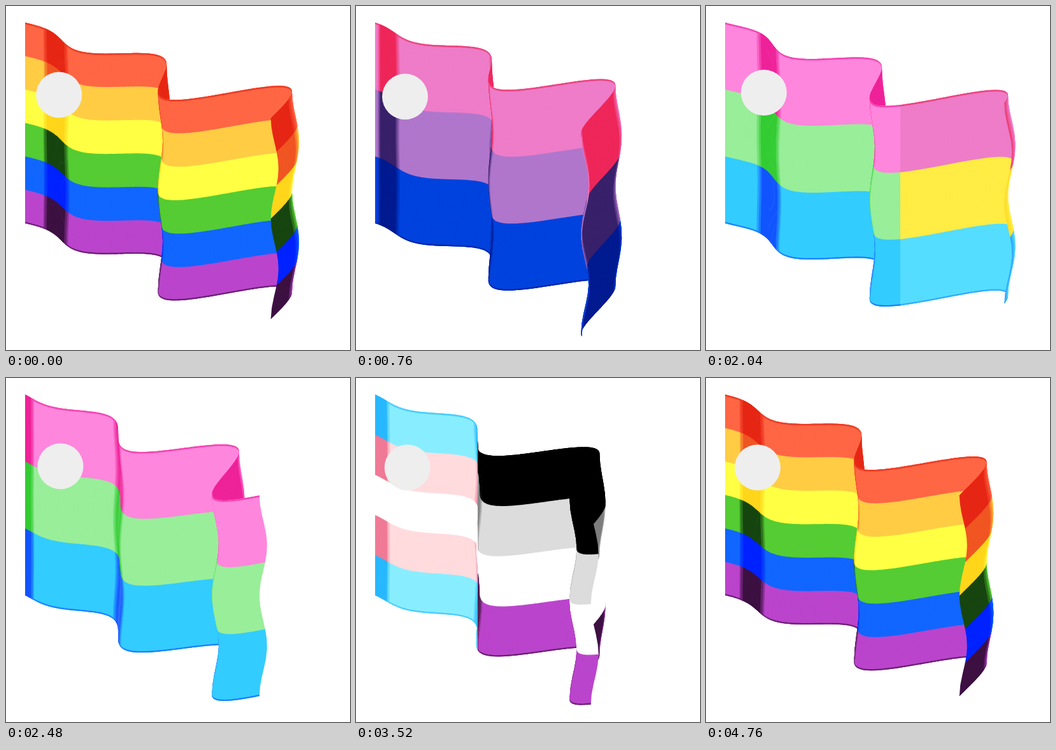
Write an HTML page with a canvas that moves like this. It is 540 by 540 pixels and loops after 4800 ms.

```html
<!DOCTYPE html>
<html lang="en">
<head>
<meta charset="utf-8">
<title>Waving pride flags</title>
<style>
  html, body { margin: 0; height: 100%; overflow: hidden; background: #fff; }
  canvas { display: block; width: 540px; height: 540px; }
</style>
</head>
<body>
<canvas id="stage" width="540" height="540"></canvas>
<script>
const ctx = document.getElementById('stage').getContext('2d');
const LOOP = 4800, STEP = 40, WAVE = 960, TURN = 800;
const COLUMNS = 220, WAVES = 2.28, HEIGHT = 315, SHADES = 4;
const TAU = Math.PI * 2;

// Each stripe is "lit shaded".
const purple = 'bb44cc 3d1042', pink = 'ee7cc8 ee2659', white = 'ffffff ffffff';
const sky = '88eeff 28b8ff', blush = 'ffdbde f07a96';
const flags = [
  ['ff6644 e62614', 'ffcc44 f05522', 'ffff44 ffd61a', '55cc33 16450f', '1166ff 0022ff', purple],
  [pink, 'b076cc 38206a', '0042dd 001a90'],
  [pink, 'ffec44 ffd61a', '55ddff 2090ff'],
  ['ff86dd ee2299', '99ee99 33cc33', '33ccff 1155ff'],
  ['000000 000000', 'dcdcdc 7d7d7d', white, purple],
  [sky, blush, white, blush, sky]
].map(stripes => stripes.map(ramp));

function ramp(pair) {
  const [lit, dark] = pair.split(' ').map(hex =>
    [0, 2, 4].map(i => parseInt(hex.slice(i, i + 2), 16)));
  return Array.from({ length: SHADES }, (_, i) =>
    `rgb(${lit.map((c, j) => Math.round(c + (dark[j] - c) * i / (SHADES - 1)))})`);
}

const clamp = x => Math.max(0, Math.min(1, x));

// Angle of the travelling wave at distance u along the cloth.
const angle = (u, t) => TAU * (t / WAVE - 6.5 / 24 + WAVES * (1 - u));

// Screen position of cloth point (u, v), both from 0 to 1.
function surface(u, v, t) {
  const swing = u * Math.cos(angle(u, t));
  return [
    30 + 401 * u + 71 * swing - 6 * u * Math.cos(2 * TAU * v),
    26 + 146 * u - 32 * swing + HEIGHT * v
  ];
}

function shade(u, t) {
  const a = angle(u, t) + TAU * (0.04 + 0.15 * Math.exp(-25 * u));
  return Math.round(clamp((-Math.sin(a) - 0.4) / 0.35) * (SHADES - 1));
}

function patch(u0, u1, v0, v1, t, color) {
  const parts = Math.max(1, Math.ceil((v1 - v0) * 18));
  ctx.beginPath();
  for (let i = 0; i <= parts; i++) {
    ctx.lineTo(...surface(u0, v0 + (v1 - v0) * i / parts, t));
  }
  for (let i = parts; i >= 0; i--) {
    ctx.lineTo(...surface(u1, v0 + (v1 - v0) * i / parts, t));
  }
  ctx.fillStyle = color;
  ctx.fill();
}

// Columns go from the pole outwards, so that later folds cover earlier ones.
function drawFlag(stripes, t, left, right) {
  ctx.save();
  ctx.beginPath();
  ctx.rect(left, 0, right - left, 540);
  ctx.clip();
  const n = stripes.length;
  for (let c = 0; c < COLUMNS; c++) {
    const u0 = Math.max(0, (c - 0.7) / COLUMNS), u1 = (c + 1) / COLUMNS;
    const level = shade((c + 0.5) / COLUMNS, t);
    stripes.forEach((colors, i) =>
      patch(u0, u1, i / n, Math.min(1, (i + 1) / n + 0.003), t, colors[level]));
    const rim = Math.max(level, 2);
    patch(u0, u1, 0, 0.008, t, stripes[0][rim]);
    patch(u0, u1, 0.993, 1, t, stripes[n - 1][rim]);
  }
  ctx.restore();
}

function drawBadge(t) {
  ctx.beginPath();
  ctx.arc(...surface(0.14, 0.29, t), 36, 0, TAU);
  ctx.fillStyle = '#eee';
  ctx.fill();
}

function frame(now) {
  const t = Math.floor(now % LOOP / STEP) * STEP;
  const turn = Math.floor((t - 160) / TURN);
  const since = t - 160 - turn * TURN;
  const edge = Math.min(540, Math.round(30 + 1.039 * since - 0.0002 * since * since));
  ctx.fillStyle = '#fff';
  ctx.fillRect(0, 0, 540, 540);
  if (edge < 510) drawFlag(flags[(turn + 6) % 6], t, edge, 540);
  drawFlag(flags[(turn + 7) % 6], t, 0, edge);
  drawBadge(t);
  requestAnimationFrame(frame);
}
requestAnimationFrame(frame);
</script>
</body>
</html>
```
